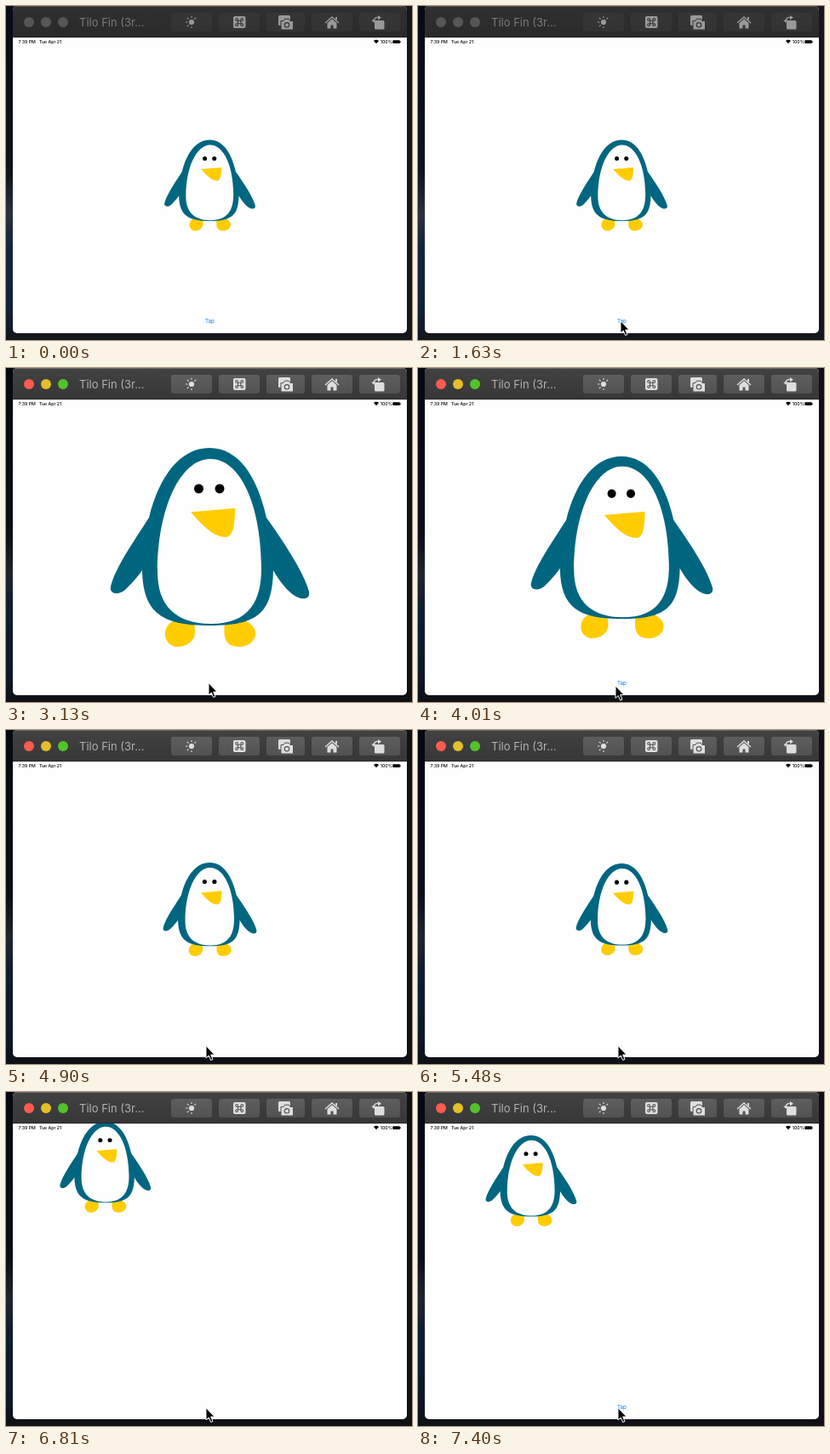
Write an HTML page that moves like this. It is 477 px wide and 393 px high and loops after 8000 ms.

```html
<!DOCTYPE html>
<html lang="en">
<head>
<meta charset="utf-8">
<title>Spring penguin</title>
<style>
  html, body { margin: 0; width: 100%; height: 100%; overflow: hidden; background: #0a0f18; }
  svg { display: block; font-family: Inter, Roboto, sans-serif;
        --bar-top: #303030; --bar-end: #2a2a2a; --key-top: #363636; --key-end: #333;
        --edge: #555; --icon: #999; --title: #7c7c7c; --red: #565656; --amber: #565656; --green: #565656; }
  svg.active { --bar-top: #424242; --bar-end: #373737; --key-top: #5e5e5e; --key-end: #525252;
        --edge: #6a6a6a; --icon: #dedede; --title: #b2b2b2; --red: #ff5a50; --amber: #e4bf27; --green: #53c22b; }
  #shade { opacity: 0; }
  .active #shade { opacity: .25; }
  .key { fill: url(#key); }
  .icon { fill: var(--icon); }
  .line { fill: none; stroke: var(--icon); stroke-width: 1.4; }
  .cut { fill: var(--key-end); }
  .status { font-size: 5.2px; font-weight: 500; }
  .teal { fill: #006680; }
  .gold { fill: #fc0; }
</style>
</head>
<body>
<svg id="stage" width="477" height="393" viewBox="0 0 477 393">
  <defs>
    <linearGradient id="bar" x2="0" y2="1">
      <stop stop-color="var(--bar-top)"/><stop offset="1" stop-color="var(--bar-end)"/>
    </linearGradient>
    <linearGradient id="key" x2="0" y2="1">
      <stop stop-color="var(--key-top)"/><stop offset="1" stop-color="var(--key-end)"/>
    </linearGradient>
    <linearGradient id="rock" x2="0" y2="1">
      <stop stop-color="#080b14"/><stop offset=".5" stop-color="#10141d"/>
      <stop offset=".62" stop-color="#2b323c"/><stop offset=".72" stop-color="#15263b"/>
      <stop offset=".9" stop-color="#122236"/><stop offset="1" stop-color="#12161d"/>
    </linearGradient>
    <clipPath id="window"><rect x="8" width="463" height="385" rx="5"/></clipPath>
    <clipPath id="screen"><rect x="8" y="37" width="463" height="348"/></clipPath>
  </defs>

  <rect width="477" height="393" fill="#14171e"/>
  <rect width="8" height="393" fill="url(#rock)"/>
  <rect id="shade" width="477" height="393"/>

  <g clip-path="url(#window)">
    <rect x="8" width="463" height="385" fill="#fefefe"/>
    <rect x="8" width="463" height="37" fill="url(#bar)"/>
    <path d="M8 .5H471" stroke="var(--edge)"/>
    <path d="M8 36.8H471" stroke="#151515" stroke-width=".6"/>
  </g>
  <circle cx="27" cy="19" r="6" fill="var(--red)"/>
  <circle cx="47" cy="19" r="6" fill="var(--amber)"/>
  <circle cx="67" cy="19" r="6" fill="var(--green)"/>
  <text x="86" y="24" font-size="13" fill="var(--title)">Tilo Fin (3r...</text>

  <g class="key">
    <rect x="194" y="8" width="48" height="22" rx="3"/>
    <rect x="250" y="8" width="48" height="22" rx="3"/>
    <rect x="306" y="8" width="45" height="22" rx="3"/>
    <rect x="359" y="8" width="48" height="22" rx="3"/>
    <rect x="415" y="8" width="48" height="22" rx="3"/>
  </g>

  <circle class="icon" cx="218" cy="19" r="3.1"/>
  <path class="line" style="stroke-width:1.1" d="M211 19h2.5M212.8 13.8l1.8 1.8M212.8 24.2l1.8-1.8M218 12v2M218 24v2M223.2 13.8l-1.8 1.8"/>

  <rect class="icon" x="267" y="12" width="14.5" height="14" rx="2"/>
  <g transform="translate(274.2 19)" fill="none" stroke="var(--key-end)" stroke-width="1.1">
    <path d="M-1.7-1.7H1.7V1.7H-1.7Z"/>
    <circle cx="-3.1" cy="-3.1" r="1.4"/><circle cx="3.1" cy="-3.1" r="1.4"/>
    <circle cx="-3.1" cy="3.1" r="1.4"/><circle cx="3.1" cy="3.1" r="1.4"/>
  </g>

  <rect class="icon" x="320" y="11" width="14" height="12" rx="1.5"/>
  <path class="icon" style="stroke:var(--key-end)" d="M323 17.5h3l1.5-2.3h5l1.5 2.3h3.5V28H323Z"/>
  <circle class="cut" cx="330" cy="22.3" r="3.3"/>
  <circle class="icon" cx="330" cy="22.3" r="2.1"/>

  <path class="line" d="M375 20l8-7 8 7"/>
  <path class="icon" d="M377.5 20l5.5-4.8 5.5 4.8V26.500h-4v-4h-3v4h-4ZM387 13h2v4l-2-1.800Z"/>

  <rect class="icon" x="433" y="17" width="11.500" height="10.500" rx="1.500"/>
  <path class="line" d="M432 18c0-4 3-5 6.500-4.500"/>
  <path class="icon" d="M437 11l4 2.700-4 2.800ZM429.300 16.500h5.400l-2.700 3.300Z"/>

  <g id="penguin" clip-path="url(#screen)">
    <g id="pose">
      <path class="gold" d="M198 297C183 303 183 324 199 328C212 329 222 321 222 311L221 294ZM257 300C254 323 262 328 275 328C292 327 298 312 289 303L278 294Z"/>
      <path class="teal" d="M239 94C205 94 180 127 168 176C150 204 128 236 123 257C121 267 134 268 142 259C150 251 156 244 160 238C161 289 184 303 240 303C296 303 313 288 314 238C319 247 326 257 334 264C345 274 358 274 356 263C350 240 325 203 306 176C295 127 273 94 239 94Z"/>
      <path fill="#fefefe" d="M240 107C205 107 178 165 178 240C178 280 200 301 241 301C285 301 301 275 300 232C299 160 275 107 240 107Z"/>
      <circle cx="226.500" cy="142" r="5.500"/>
      <circle cx="251" cy="142" r="5.500"/>
      <path class="gold" d="M217 169.500L269 165C269 180 268 199 258 199C243 199 229 183 217 169.500Z"/>
    </g>
  </g>

  <g class="status">
    <text x="14.500" y="44">7:39 PM</text>
    <text x="39" y="44">Tue Apr 21</text>
    <text x="439.800" y="44">100%</text>
    <path d="M432 41q3-2.400 6 0l-3 3.300Z"/>
    <rect x="454.300" y="40.300" width="8.600" height="3.800" rx=".8"/>
    <rect x="463.300" y="41.400" width=".7" height="1.600"/>
  </g>

  <text id="tap" x="234" y="373" font-size="6.200" fill="#007aff">Tap</text>
  <path id="cursor" d="M0 0V14.500L3.300 11.500L5.600 17L8 16L5.700 10.600H10Z" fill="#000" stroke="#fff" stroke-width="1"/>
</svg>

<script>
const LOOP = 8000, STEP = 147;
const ACTIVATE = 2680, PRESS = 80, DURATION = 1000;
const BURSTS = [0, 1040, ACTIVATE, 4310, 6370];
const DRAWN_SCALE = 2.186;

// Each tap springs the penguin from one pose to the next: [scale, shift]
const TAPS = [
  { at: 2741, from: [1, 0], to: [2, 0] },
  { at: 4711, from: [2, 0], to: [1, 0] },
  { at: 6385, from: [1, 0], to: [1, -106.6] },
];

// Pointer: [time, x, y]
const POINTER = [
  [1040, 365, 340], [1187, 318, 346], [1334, 270, 357], [1481, 245, 367], [1628, 238, 370.500],
  [3850, 238, 370.500], [4000, 232, 374], [4310, 232, 374], [4600, 235, 371.500],
];

const el = id => document.getElementById(id);
const mix = (a, b, p) => a + (b - a) * p;

function sampled(t) {
  const start = BURSTS.filter(b => b <= t).pop();
  return start + Math.floor((t - start) / STEP) * STEP;
}

// Damping ratio 0.5, initial velocity 5, settled after the duration
function spring(ms) {
  if (ms <= 0) return 0;
  if (ms >= DURATION) return 1;
  const s = ms / 1000, decay = 4.4, freq = decay * Math.sqrt(3);
  return 1 - Math.exp(-decay * s) * (Math.cos(freq * s) + (decay - 5) / freq * Math.sin(freq * s));
}

function pointerAt(t) {
  const i = POINTER.findIndex(k => k[0] > t);
  if (i < 0) return POINTER[POINTER.length - 1].slice(1);
  const [t0, x0, y0] = POINTER[i - 1], [t1, x1, y1] = POINTER[i];
  const p = (t - t0) / (t1 - t0);
  return [mix(x0, x1, p), mix(y0, y1, p)];
}

function draw() {
  const t = sampled(performance.now() % LOOP);
  el('stage').classList.toggle('active', t >= ACTIVATE);

  const tap = TAPS.filter(k => k.at <= t).pop() || TAPS[0];
  const p = spring(t - tap.at);
  const [scale, shift] = tap.from.map((v, i) => mix(v, tap.to[i], p));
  el('pose').setAttribute('transform',
    `translate(${239.500 + shift} ${211 + shift}) scale(${scale / DRAWN_SCALE}) translate(-239.500 -211)`);

  const hidden = TAPS.some(k => t >= k.at && t < k.at + DURATION);
  const pressed = TAPS.some(k => t >= k.at - PRESS && t < k.at);
  el('tap').setAttribute('opacity', hidden ? 0 : pressed ? .15 : 1);

  const shown = t >= POINTER[0][0];
  el('cursor').setAttribute('visibility', shown ? 'visible' : 'hidden');
  if (shown) el('cursor').setAttribute('transform', `translate(${pointerAt(t)})`);
  requestAnimationFrame(draw);
}
draw();
</script>
</body>
</html>
```
